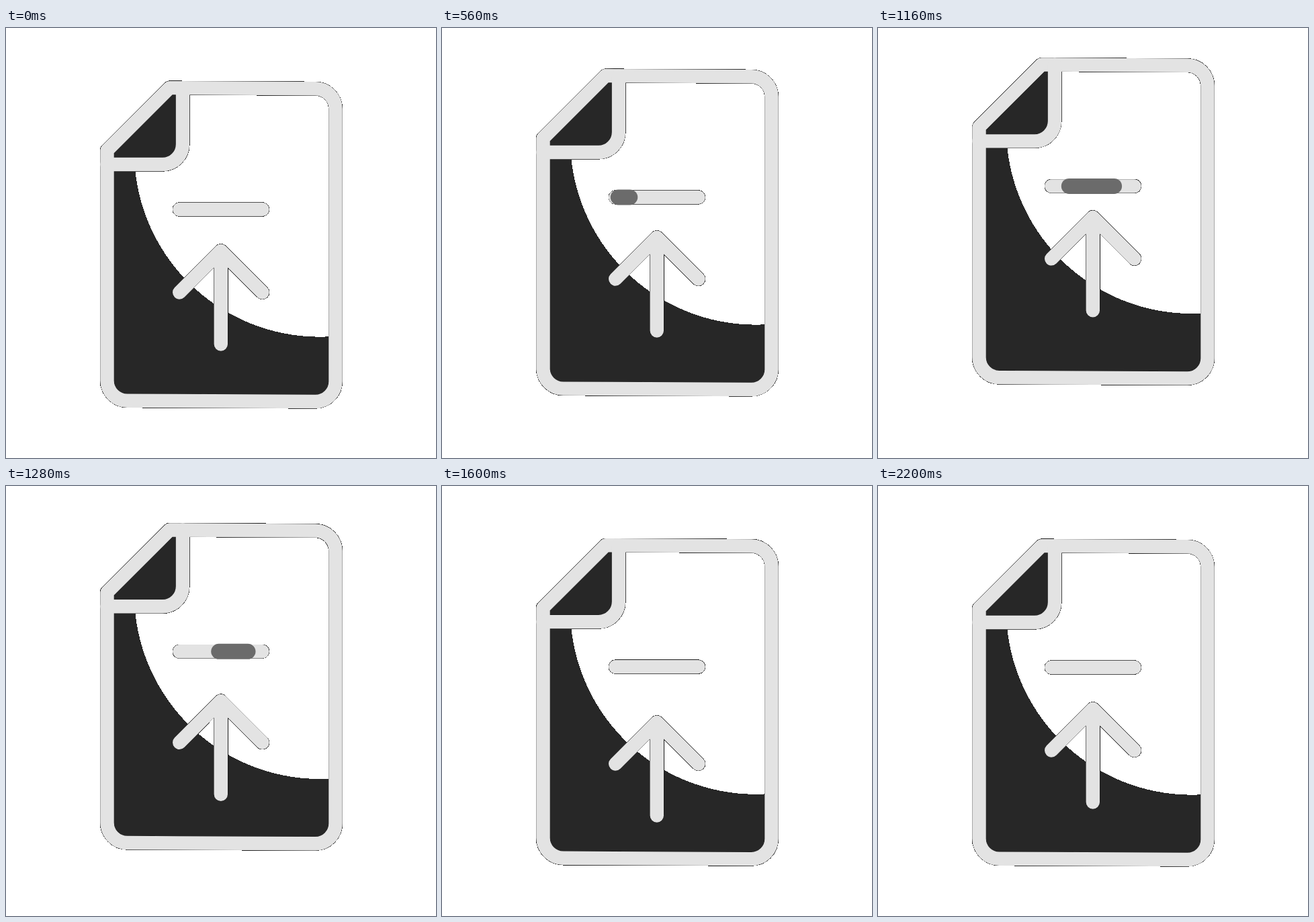
These frames come from a looping animation (640 px wide and 640 px high, 2400 ms). An HTML page:

```html
<!DOCTYPE html>
<html lang="en">
<head>
<meta charset="utf-8">
<title>Upload file</title>
<style>
  html, body { margin: 0; width: 100%; height: 100%; overflow: hidden; background: #fff; }
  svg { display: block; width: 100vw; height: 100vh; }
  .line, .rim { fill: none; stroke-linecap: round; stroke-linejoin: round; }
  .line { stroke: #e3e3e3; stroke-width: 20.4; }
  /* Hard-edged dark hairline under the grey strokes */
  .rim { stroke: #1c1c1c; stroke-width: 21.4; shape-rendering: crispEdges; }
  .dark { fill: #272727; }
  .hole { fill: #fff; shape-rendering: crispEdges; }
  #fill { stroke: #6b6b6b; stroke-width: 23; stroke-linecap: round; }
</style>
</head>
<body>
<svg viewBox="0 0 640 640">
  <defs>
    <path id="sheet" d="M243.5 89.1 L460.5 90.3 A30 30 0 0 1 490.5 120.3 V526 A30 30 0 0 1 460.5 556 L180.5 554.7 A30 30 0 0 1 150.5 524.7 V182 Z"/>
    <path id="fold" d="M263 89.2 V173 A30 30 0 0 1 233 203 H150.5"/>
    <path id="bar" d="M258.2 270 H381.6"/>
    <path id="shape" d="M258.2 393.5 L319.8 331.7 L381.6 393.5 M319.8 331.7 V470.5"/>
    <clipPath id="inside"><use href="#sheet"/></clipPath>
  </defs>
  <g id="doc">
    <use href="#sheet" class="dark"/>
    <circle class="hole" cx="467" cy="183.5" r="276.2" clip-path="url(#inside)"/>
    <path class="dark" d="M243.5 89.1 L263 89.2 V173 A30 30 0 0 1 233 203 H150.5 V182 Z"/>
    <g class="rim"><use href="#sheet"/><use href="#fold"/><use href="#bar"/></g>
    <g class="line"><use href="#sheet"/><use href="#fold"/><use href="#bar"/></g>
    <line id="fill" y1="270" y2="270"/>
  </g>
  <g id="arrow">
    <use href="#shape" class="rim"/>
    <use href="#shape" class="line"/>
  </g>
</svg>
<script>
  const LOOP = 2400, STEP = 40;
  const byId = id => document.getElementById(id);
  const doc = byId('doc'), arrow = byId('arrow'), fill = byId('fill');

  const bezier = (a, b, s) => 3 * a * s * (1 - s) ** 2 + 3 * b * s * s * (1 - s) + s ** 3;

  // Same curve as cubic-bezier(.6, 0, .3, 1), solved by bisection.
  function ease(x) {
    let lo = 0, hi = 1;
    for (let i = 0; i < 24; i++) {
      const mid = (lo + hi) / 2;
      if (bezier(.6, .3, mid) < x) lo = mid; else hi = mid;
    }
    return bezier(0, 1, lo);
  }

  // Eased progress from one time to another, held at 0 before and 1 after.
  const progress = (t, from, to) => ease(Math.min(1, Math.max(0, (t - from) / (to - from))));

  const shift = (el, y) => el.setAttribute('transform', `translate(0 ${y})`);

  function draw(now) {
    const t = Math.floor(now % LOOP / STEP) * STEP;

    shift(doc, 38.7 * (progress(t, 950, 1730) - progress(t, 240, 950)));
    shift(arrow, -64 * progress(t, 320, 930) + 84 * progress(t, 960, 1590)
      - 20 * progress(t, 1590, 2220));

    const grow = progress(t, 330, 970), leave = progress(t, 990, 1660);
    const x1 = 258.2 + 17 * grow + 100 * leave;
    const x2 = 258.2 + 91 * grow + 26 * leave;
    fill.setAttribute('x1', x1);
    fill.setAttribute('x2', x2);
    fill.setAttribute('visibility', x2 - x1 > 2 ? 'visible' : 'hidden');
  }

  const begin = performance.now();
  function tick() {
    draw(performance.now() - begin);
    requestAnimationFrame(tick);
  }
  tick();
</script>
</body>
</html>
```
